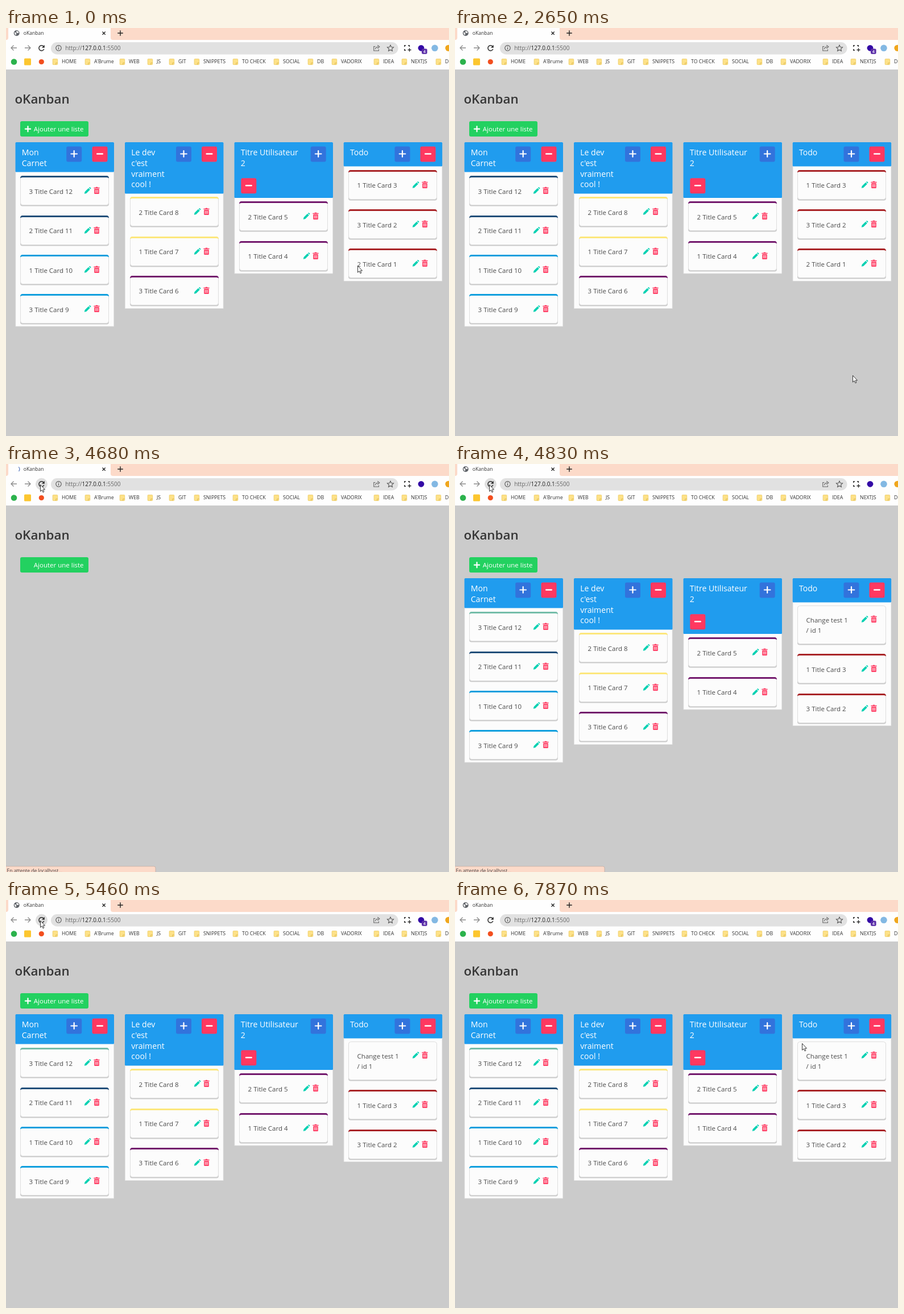
Recreate the animation shown at these times as an HTML page. Size 779 by 718 pixels, loop 7990 ms.

```html
<!DOCTYPE html>
<html lang="fr">
<head>
<meta charset="utf-8">
<title>oKanban</title>
<style>
  html, body { margin: 0; width: 100%; height: 100%; overflow: hidden; background: #cbcbcb; }
  svg { display: block; width: 779px; height: 718px; font-family: "Open Sans", "Noto Sans", sans-serif; }
</style>
</head>
<body>
<svg id="stage" viewBox="0 0 779 718"></svg>
<script>
const LOOP = 7990;
const NAVY = '#224f7a', SKY = '#119fde', MINT = '#74bda9';
const YELLOW = '#fde77c', PURPLE = '#73196d', RED = '#a92427';

// Drawing helpers
const text = (x, y, size, fill, str, extra = '') =>
  `<text x="${x}" y="${y}" font-size="${size}" fill="${fill}" ${extra}>${str}</text>`;
const rect = (x, y, w, h, fill, r = 0, extra = '') =>
  `<rect x="${x}" y="${y}" width="${w}" height="${h}" rx="${r}" fill="${fill}" ${extra}/>`;
const circle = (x, y, r, fill, extra = '') =>
  `<circle cx="${x}" cy="${y}" r="${r}" fill="${fill}" ${extra}/>`;
const line = (d, color, width = 1.2, extra = '') =>
  `<path d="${d}" fill="none" stroke="${color}" stroke-width="${width}" ${extra}/>`;
const at = (x, y, body) => `<g transform="translate(${x} ${y})">${body}</g>`;
const group = (id, body) => `<g id="${id}">${body}</g>`;

const plus = (x, y, r = 5.3, color = '#fff', w = 2.2) =>
  line(`M${x - r} ${y}h${2 * r}M${x} ${y - r}v${2 * r}`, color, w, 'stroke-linecap="round"');
const minus = (x, y) => line(`M${x - 4.8} ${y}h9.6`, '#fff', 2.4, 'stroke-linecap="round"');

const pencil = `<path fill="#00d1b2" d="M-5.7 5.7L-4.9 2.2L1.6 -4.3L4.3 -1.6L-2.2 4.9Z
  M2.4 -5L3.3 -5.7Q4 -6.1 4.6 -5.5L5.6 -4.5Q6.1 -3.9 5.7 -3.2L5 -2.4Z"/>`;
const trash = rect(-5.2, -5.2, 10.4, 1.5, '#ff3860', .5) + rect(-1.9, -6.2, 3.8, 1.3, '#ff3860', .5) +
  rect(-4.3, -3, 8.6, 9, '#ff3860', 1) + line('M-2.1 -1.4v5.6M0 -1.4v5.6M2.1 -1.4v5.6', '#fcfcfc', .9);

function card(colX, y, lines, color) {
  const x = Math.round(colX + 8.5), top = Math.round(y);
  const h = lines.length > 1 ? 68 : 52;
  let out = rect(x, top + 1.6, 156, h, '#c9c9c9', 4) +
    rect(x + .5, top + .5, 155, h - 1, '#fcfcfc', 4, 'stroke="#dedede"');
  if (color) {
    out += `<path fill="${color}" d="M${x} ${top + 4.5}q0-4.5 4-4.5h148q4 0 4 4.5q-1-1.5-4-1.5h-148q-3 0-4 1.5z"/>`;
  }
  const first = lines.length > 1 ? 29.2 : 31.5;
  lines.forEach((s, i) => out += text(x + 15.6, y + first + i * 18, 11.5, '#4a4a4a', s));
  const iconY = Math.round(y + (lines.length > 1 ? 23.5 : 26));
  return out + at(x + 118.5, iconY, pencil) + at(x + 134.5, iconY, trash);
}

function column(x, head, bottom, title, minusPos, plusX, cards) {
  let out = rect(x, 201, 173.5, bottom - 201, '#dedede') +
    rect(x + .8, 201, 172, bottom - 201.8, '#fcfcfc') +
    rect(x, 201, 173.5, head - 201, '#209cee', 1.5);
  title.forEach((s, i) => out += text(x + 11.2, 224 + i * 18.75, 14.1, '#fff', s));
  const [mx, my] = minusPos;
  out += rect(plusX, 208.5, 27, 27, '#3273dc', 3) + plus(plusX + 13.5, 221.5) +
    rect(mx, my, 27, 27, '#ff3860', 3) + minus(mx + 13.5, my + 13);
  return out + cards.map(c => card(x, ...c)).join('');
}

// Cards of equal height, stacked from y
const stack = (y, list) => list.map(([s, color], i) => [y + i * 69.3, [s], color]);

function board(edited) {
  const todo = edited
    ? [[249.3, ['Change test 1', '/ id 1'], null],
       ...stack(334.2, [['1 Title Card 3', RED], ['3 Title Card 2', RED]])]
    : stack(249.7, [['1 Title Card 3', RED], ['3 Title Card 2', RED], ['2 Title Card 1', RED]]);
  return column(16.5, 253.5, 525.5, ['Mon', 'Carnet'], [151.5, 208.5], 106.2,
      stack(260.4, [['3 Title Card 12', edited ? MINT : NAVY], ['2 Title Card 11', NAVY],
        ['1 Title Card 10', SKY], ['3 Title Card 9', SKY]])) +
    column(209, 291.5, 494, ['Le dev', "c'est", 'vraiment', 'cool !'], [344, 208.5], 299,
      stack(297.2, [['2 Title Card 8', YELLOW], ['1 Title Card 7', YELLOW], ['3 Title Card 6', PURPLE]])) +
    column(401.5, 299, 432.5, ['Titre Utilisateur', '2'], [413.3, 264.3], 535.7,
      stack(305.4, [['2 Title Card 5', PURPLE], ['1 Title Card 4', PURPLE]])) +
    column(593.7, 243.5, edited ? 461 : 445.8, ['Todo'], [728.5, 208.5], 683.5, todo);
}

function browser() {
  const bookmarks = [['HOME', 98], ["A'Brume", 155], ['WEB', 216], ['JS', 265], ['GIT', 303],
    ['SNIPPETS', 347], ['TO CHECK', 415], ['SOCIAL', 487], ['DB', 547], ['VADORIX', 589],
    ['IDEA', 663], ['NEXTJS', 712], ['DEV', 772]];
  const folder = x => rect(x + .5, 54.5, 8.5, 10, '#fde187', 1, 'stroke="#ecc95f" stroke-width=".8"') +
    line(`M${x + 6} 64.5v-3h3`, '#d9b348', .8);
  const arrow = (x, dir, color) =>
    line(`M${x - 5 * dir} 35h${10 * dir}M${x + .5 * dir} 30.5l${4.5 * dir} 4.5l${-4.5 * dir} 4.5`, color, 1.3);
  return rect(0, 0, 779, 21, '#fcdac9') + rect(0, 21, 779, 52, '#fefefe') +
    '<path fill="#fefefe" d="M0 21q4 0 4-4V0H184V17q0 4 4 4z"/>' +
    text(30.7, 12.2, 8.6, '#333', 'oKanban') +
    line('M169.5 6.5l5.2 5.2M174.7 6.5l-5.2 5.2', '#222', 1.3) +
    plus(201, 9, 4.3, '#222', 1.4) +
    arrow(14, -1, '#8a8a8a') + arrow(38, 1, '#8a8a8a') +
    group('hover', circle(62.5, 35.3, 10.5, '#dedede')) +
    line('M66.6 33.2A4.6 4.6 0 1 0 66.8 37', '#333', 1.6) +
    '<path fill="#333" d="M67.8 29.8v4.9h-4.9z"/>' +
    rect(79, 25, 610.5, 21.5, '#e1e1e1', 10.7) +
    circle(92.5, 35.3, 4.7, 'none', 'stroke="#555" stroke-width="1.1"') +
    line('M92.5 34.6v3.2M92.5 32.4v1.2', '#555', 1.2) +
    text(104.2, 39, 10, '#666', 'http://<tspan fill="#222">127.0.0.1</tspan>:5500') +
    line('M649.5 32.5h-2.7v7.5h8.6v-2.5M649.5 37.3q.5-4 5-4.2M653.3 30.2l3.6 2.9l-3.6 2.9', '#666', 1.1) +
    line('M676 30l1.6 3.6l3.9.4l-2.9 2.6l.8 3.9l-3.4-2l-3.4 2l.8-3.9l-2.9-2.6l3.9-.4z', '#555', 1.1) +
    line('M700.8 33v-2.2h2.3M707 30.8h2.4V33M700.8 37v2.3h2.3M709.5 35.5v6M706.5 38.5h6', '#333', 1.5) +
    circle(730, 35.3, 5.4, '#3308a5') +
    group('badge', rect(731, 36.5, 9.6, 9.3, '#5b2fa8', 2) +
      text(735.8, 44, 7.4, '#fff', '4', 'text-anchor="middle" font-weight="600"')) +
    circle(754, 35.3, 5.8, '#83b8e3') + circle(778, 35.3, 5.6, '#f0a61c') +
    circle(14, 59.5, 5.3, '#2bb24c') + rect(32, 53.5, 12, 12, '#fcc62f', 1.5) + circle(62.3, 59.5, 4.6, '#f24e1e') +
    bookmarks.map(([s, x]) => folder(x - 16.3) + text(x, 62.4, 8.8, '#333', s)).join('');
}

const globe = circle(18.7, 9, 5, '#5f6368') +
  '<path fill="#fefefe" d="M15 7.2l2.7 1.3l.6 1.6l-1 2.3q-2.6-1.2-2.3-5.2zM18.3 5.3l3 .4l1.3 2.6l-2.4.6l-2-1.2z"/>';
const page = text(15.4, 133.4, 22.4, '#363636', 'oKanban', 'font-weight="600"') +
  rect(25, 164, 120, 27, '#23d160', 3) + text(48.8, 182.1, 11.5, '#fff', 'Ajouter une liste');
const status = rect(-4, 708, 267, 20, '#fcdac9', 3, 'stroke="#c3ada2" stroke-width=".8"') +
  text(1.5, 718.6, 8.5, '#444', 'En attente de localhost...');

const stage = document.getElementById('stage');
stage.innerHTML = rect(0, 0, 779, 718, '#cbcbcb') + browser() + page +
  group('globe', globe) +
  group('dot', circle(19.5, 4.3, .6, '#8a94a8')) +
  group('arc', line('M22.2 5.2q3.2 3.4 .4 7.6', '#5577bd', 1.2)) +
  group('addIcon', plus(38.5, 177.7, 4.6)) +
  group('before', board(false)) + group('after', board(true)) +
  group('status', status) +
  group('cursor', '<path d="M.5 .5V12.2L3.2 9.8L5 13.8L6.9 13L5.1 9.1H8.5Z" fill="#fff" stroke="#222" stroke-width=".9"/>');

// Pointer steps: time, x, y
const pointer = [
  [0, 618, 418], [150, 618, 412], [410, 629, 410], [530, 639, 409], [680, 651, 407],
  [810, 664, 407], [940, 675, 410], [1090, 682, 410], [1240, 685, 417], [1370, 685, 426],
  [1520, 691, 530], [1640, 699, 611], [2930, 699, 610], [3220, 520, 360], [3340, 193, 21],
  [3460, 120, -40], [3610, 59, 3], [3750, 57, 20], [3870, 58, 31], [4020, 60, 36],
  [6930, 110, 71], [7050, 290, 130], [7170, 487, 201], [7320, 616, 220], [7470, 656, 240],
  [7590, 641, 254], [7720, 625, 251], [7870, 610, 252]
];

// Visible spans of each part
const spans = {
  before: [[0, 4680]], after: [[4830, LOOP]],
  addIcon: [[0, 4680], [4830, LOOP]],
  globe: [[0, 4530], [4830, LOOP]],
  dot: [[4530, 4680]], arc: [[4680, 4830]],
  badge: [[0, 4530], [5460, LOOP]],
  status: [[4530, 5210]],
  hover: [[3870, 6930]]
};
const part = id => document.getElementById(id);
const parts = Object.entries(spans).map(([id, on]) => [part(id), on]);
const cursor = part('cursor');

function draw(t) {
  for (const [el, on] of parts) {
    el.style.display = on.some(([a, b]) => t >= a && t < b) ? '' : 'none';
  }
  const [, x, y] = pointer.findLast(p => p[0] <= t);
  cursor.setAttribute('transform', `translate(${x} ${y})`);
}

const start = performance.now();
function tick() {
  draw((performance.now() - start) % LOOP);
  requestAnimationFrame(tick);
}
tick();
</script>
</body>
</html>
```
